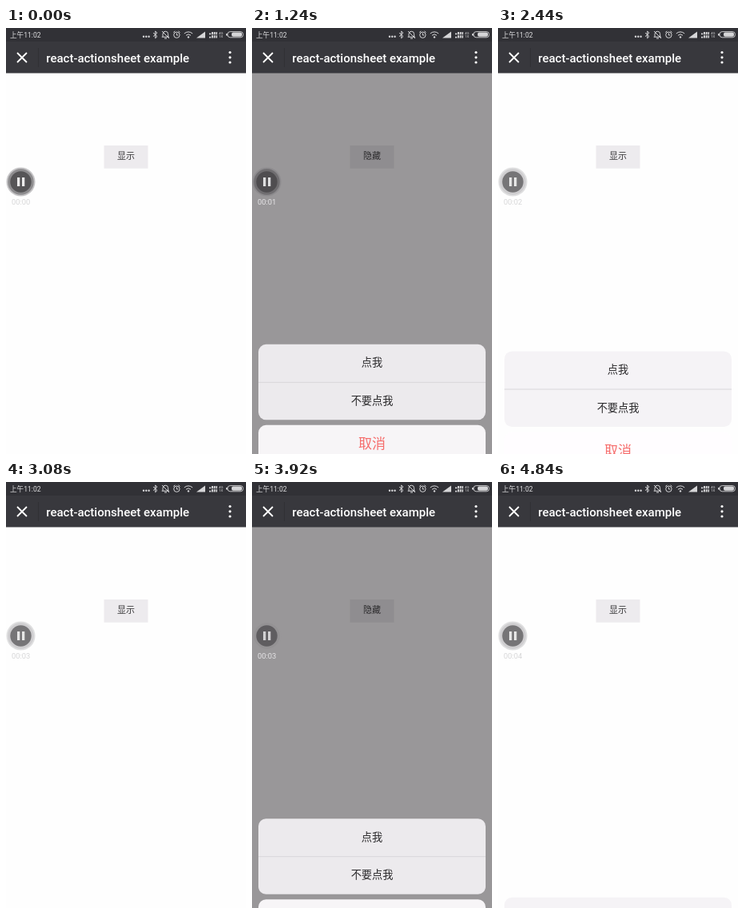
Animation of 300 by 533 pixels, one loop 5 s. Source, as an HTML page:

```html
<!DOCTYPE html>
<html lang="zh-CN">
<head>
<meta charset="utf-8">
<title>react-actionsheet example</title>
<style>
  html, body { margin: 0; height: 100%; overflow: hidden; background: #fff; }
  svg { display: block; width: 100vw; height: 100vh; }
  text { font-family: Roboto, "Noto Sans CJK SC", "Noto Sans CJK", sans-serif; }
  .mid { text-anchor: middle; }
  .line { fill: none; stroke: #d6d6d8; stroke-width: 1; }
</style>
</head>
<body>
<svg viewBox="0 0 300 533">
  <rect id="page" y="56" width="300" height="477"/>
  <rect id="button" x="122.5" y="147" width="55" height="28.7"/>
  <text id="label" class="mid" x="150" y="164" font-size="11"></text>

  <g id="sheet">
    <rect x="8" y="376" width="284" height="94.5" rx="9.5" fill="#f4f2f6" fill-opacity=".91"/>
    <path d="M8 423.5H292" stroke="#d8d6da"/>
    <rect x="8" y="477" width="284" height="47.7" rx="9.5" fill="#fffdff" fill-opacity=".92"/>
    <g class="mid" font-size="13.2" fill="#29282a">
      <text x="150" y="403.5">点我</text>
      <text x="150" y="451">不要点我</text>
      <text x="150" y="506.3" font-size="17" font-weight="500" fill="#f66d6c">取消</text>
    </g>
  </g>

  <!-- recorder bubble -->
  <circle id="halo" cx="18.5" cy="192.5" r="18"/>
  <circle id="ring" cx="18.5" cy="192.5" r="16.2"/>
  <circle id="disc" cx="18.5" cy="192.5" r="13.2"/>
  <path id="bars" d="M14 187h3.3v11h-3.3zM20 187h3.3v11h-3.3z"/>
  <text id="clock" class="mid" x="18.6" y="221" font-size="9.3"></text>

  <!-- status bar and title bar -->
  <rect width="300" height="56.5" fill="#38383d"/>
  <rect width="300" height="17" fill="#313136"/>
  <path d="M40.5 25V49" stroke="#303034"/>
  <path d="M14 31L26 43M26 31L14 43" stroke="#fff" stroke-width="1.8"/>
  <text x="50.3" y="42.5" font-size="15" font-weight="500" fill="#fff">react-actionsheet example</text>
  <g fill="#fff">
    <circle cx="280" cy="30.5" r="1.6"/><circle cx="280" cy="36.8" r="1.6"/><circle cx="280" cy="43" r="1.6"/>
  </g>
  <text x="5" y="11.8" font-size="8.6" fill="#dedee0">上午11:02</text>
  <g fill="#d6d6d8">
    <circle cx="172" cy="10.8" r="1.2"/><circle cx="175.3" cy="10.8" r="1.2"/><circle cx="178.6" cy="10.8" r="1.2"/>
    <circle cx="228" cy="11.4" r="1.2"/>
    <path d="M238 12.5L249 4.5V12.5z"/>
    <rect x="275" y="6.8" width="2" height="3" rx="1"/>
    <rect x="282" y="5.6" width="13" height="5.2" rx="2"/>
    <text x="266" y="8" font-size="4.4">4G</text>
    <text x="266" y="12.4" font-size="4.4">1X</text>
  </g>
  <g class="line">
    <path d="M184 6L189 10.5L186.7 12.8V4L189 6.2L184 10.7"/>
    <path d="M196 11.2V7.5a3.3 3.3 0 0 1 6.6 0V11.2M194.7 11.2H204M198 13H201M195 4L204 13"/>
    <circle cx="213.4" cy="8.7" r="3.7"/>
    <path d="M213.4 6.4V9H215.2M209.3 5.5L211.3 3.8M217.5 5.5L215.5 3.8"/>
    <path d="M222.8 7a7.4 7.4 0 0 1 10.4 0M225 9.3a4.3 4.3 0 0 1 6 0"/>
    <path d="M254 7.4H264M257 5.8H264" stroke-width="1.6" stroke-dasharray="2 .8"/>
    <path d="M254 11.6H264M257 10H264" stroke-width="1.6" stroke-dasharray="2 .8"/>
    <rect x="277" y="4.6" width="19.4" height="7.2" rx="3.2" stroke-width=".9"/>
  </g>
</svg>
<script>
const LOOP = 5000, STEP = 40, TRAVEL = 157;
const $ = id => document.getElementById(id);
const fill = (id, color) => $(id).setAttribute('fill', color);

// CSS "ease": cubic-bezier(.25, .1, .25, 1)
function ease(x) {
  if (x <= 0) return 0;
  if (x >= 1) return 1;
  const curve = (s, a, b) => 3 * (1 - s) ** 2 * s * a + 3 * (1 - s) * s * s * b + s ** 3;
  let lo = 0, hi = 1;
  for (let i = 0; i < 24; i++) {
    const s = (lo + hi) / 2;
    if (curve(s, .25, .25) < x) lo = s; else hi = s;
  }
  return curve(lo, .1, 1);
}

// mask: masked interval; rise and fall: [start, duration]; gone: sheet removed
const cycles = [
  { mask: [960, 2440], rise: [960, 480], fall: [2400, 270], gone: 2640, hold: 2640 },
  { mask: [3760, 4600], rise: [3716, 484], fall: [4580, 400], gone: LOOP, hold: 4840 }
];
const ticks = [1040, 2040, 3080, 4080];

// bubble colours: halo, ring, disc, bars
const bubble = {
  activeLight: ['#c5c4c6', '#8e8d8f', '#565557', '#ececec'],
  activeDark: ['#8d8b8e', '#706e71', '#4f4d50', '#dededf'],
  idleLight: ['#dfdfe0', '#cfced0', '#767577', '#e6e6e6'],
  idleDark: ['#999799', '#949294', '#5f5d60', '#d2d1d3']
};

function draw(now) {
  const t = Math.floor(now % LOOP / STEP) * STEP;
  const cycle = cycles[t < 3000 ? 0 : 1];
  const part = ([start, length]) => ease((Math.min(t, cycle.hold) - start) / length);
  const dark = t >= cycle.mask[0] && t < cycle.mask[1];
  const up = part(cycle.rise) - part(cycle.fall);
  const visible = t >= cycle.mask[0] && t < cycle.gone;

  $('sheet').style.display = visible ? '' : 'none';
  $('sheet').setAttribute('transform', `translate(0 ${TRAVEL * (1 - up)})`);

  fill('page', dark ? '#999799' : '#fefefe');
  fill('button', dark ? '#8f8d90' : '#edebee');
  fill('label', dark ? '#2b2a2c' : '#3c3b3d');
  $('label').textContent = dark ? '隐藏' : '显示';

  const colors = bubble[(t < 1560 ? 'active' : 'idle') + (dark ? 'Dark' : 'Light')];
  ['halo', 'ring', 'disc', 'bars'].forEach((id, i) => fill(id, colors[i]));
  fill('clock', dark ? '#e6e5e7' : '#d6d6d7');
  $('clock').textContent = '00:0' + ticks.filter(tick => t >= tick).length;
}

const begin = performance.now();
function frame() {
  draw(performance.now() - begin);
  requestAnimationFrame(frame);
}
frame();
</script>
</body>
</html>
```
